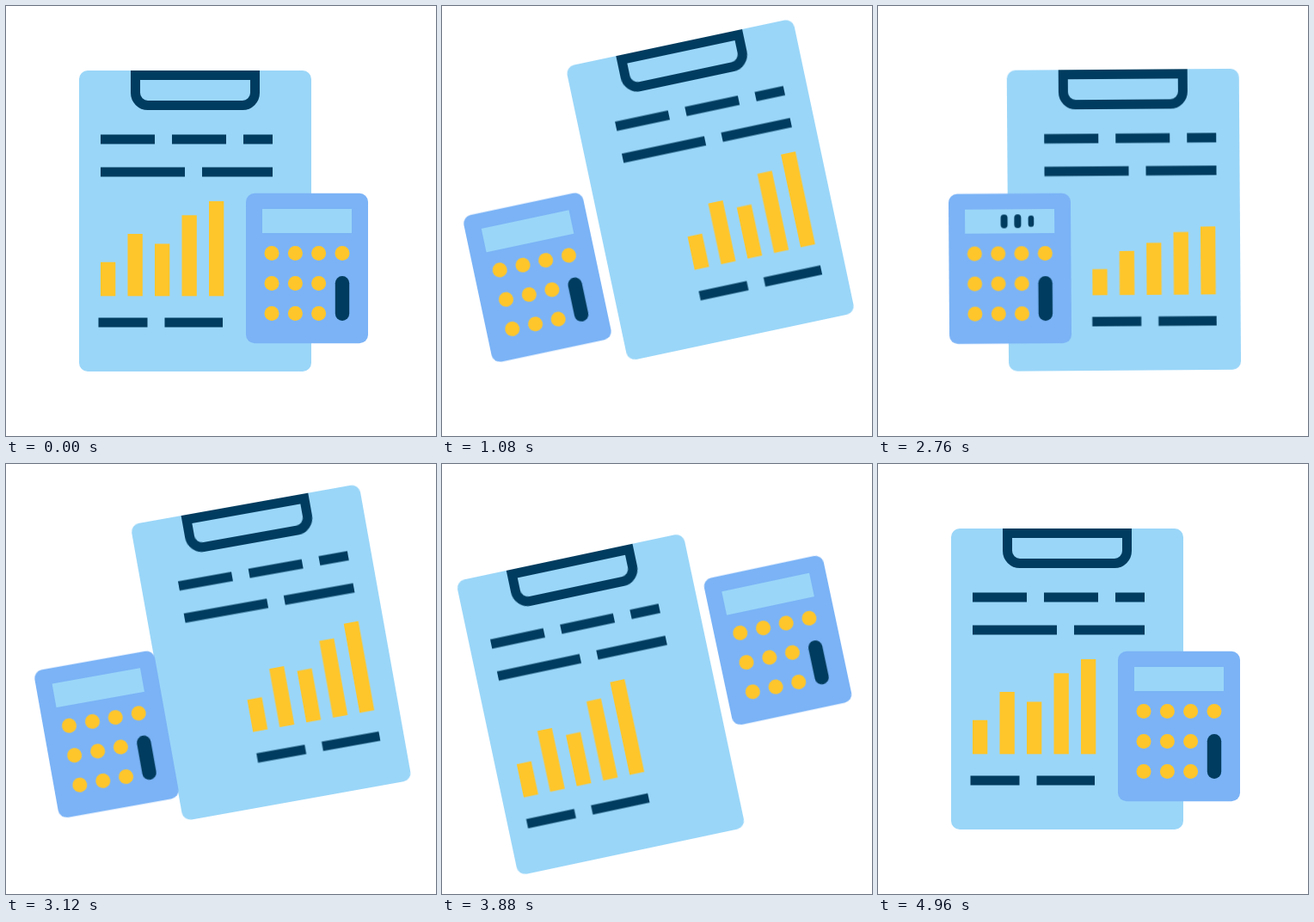
Animation of 500x500 px, one loop 5000 ms. Source, as an HTML page:

```html
<!DOCTYPE html>
<html lang="en">
<head>
<meta charset="utf-8">
<title>Report and calculator</title>
<style>
  html, body { margin: 0; width: 100%; height: 100%; overflow: hidden; background: #fff; }
  svg { position: absolute; left: 0; top: 0; width: 500px; height: 500px; }

  :root {
    --sheet: #9ad6f8;
    --body: #7bb3f6;
    --ink: #003c5f;
    --sun: #ffc62b;
    --ease: cubic-bezier(.333, 0, .667, 1);
  }
  .sheet { fill: var(--sheet); }
  .body { fill: var(--body); }
  .ink { fill: var(--ink); }
  .sun { fill: var(--sun); }
  .clip { fill: none; stroke: var(--ink); stroke-width: 11; }

  #paper { animation: paper 5s var(--ease) infinite; }
  #calc { animation: calc 5s var(--ease) infinite; }
  #front { z-index: 2; animation: layer 5s step-end infinite; }
  #back { z-index: 1; }
  .slide { animation: slide 5s var(--ease) infinite; }
  .bar, .key, .digit { transform-box: fill-box; transform-origin: center; }
  .bar { transform-origin: center bottom; animation: bar 5s var(--ease) infinite; }
  .key { animation: swell 5s var(--ease) infinite; }
  .key.pressed {
    animation: swell 5s var(--ease) infinite,
               press 5s linear calc(var(--k) * .1s - 5s) infinite;
  }
  .digit { animation: digit 5s ease-out calc(var(--k) * .1s - 5s) infinite; }

  @keyframes paper {
    0%, 98%, 100% { transform: translate(220px, 250px) rotate(0deg) scale(1); }
    11%, 76.8%, 77.6% { transform: translate(184.5px, 279.5px) rotate(-12deg) scale(1); }
    22%, 65.2% { transform: translate(312.5px, 213.5px) rotate(-12deg) scale(1); }
    33.2%, 54% { transform: translate(285px, 250px) rotate(0deg) scale(1); }
    86%, 89.6% { transform: translate(220px, 250px) rotate(0deg) scale(1.15); }
  }
  @keyframes calc {
    0%, 98%, 100% { transform: translate(350px, 305px) rotate(0deg) scale(1); }
    11%, 76.8%, 77.6% { transform: translate(390.5px, 205px) rotate(-12deg) scale(1); }
    22%, 65.2% { transform: translate(110px, 316px) rotate(-12deg) scale(1); }
    33.2%, 54% { transform: translate(155px, 305px) rotate(0deg) scale(1); }
    87.4%, 89.6% { transform: translate(350px, 305px) rotate(0deg) scale(1.15); }
  }
  /* The calculator passes behind the sheet while the two swap sides. */
  @keyframes layer {
    0%, 22%, 76.8%, 100% { z-index: 2; }
    11%, 65.2% { z-index: 0; }
  }
  @keyframes slide {
    0%, 11%, 76.8%, 100% { transform: translateX(0); }
    22%, 65.2% { transform: translateX(var(--dx)); }
  }
  @keyframes bar {
    0%, 22%, 65.2%, 100% { transform: scaleY(1); }
    33.2%, 34% { transform: scaleY(var(--low)); }
    43%, 54% { transform: scaleY(var(--rise)); }
  }
  @keyframes swell {
    0%, 79%, 91.2%, 100% { transform: scale(1); }
    84.8% { transform: scale(1.38); }
  }
  @keyframes press {
    0%, 27.2%, 32.8%, 100% { scale: 1; }
    30% { scale: .65; }
  }
  @keyframes digit {
    0%, 28%, 55%, 80.4%, 92%, 100% { transform: scale(0); }
    31.2% { transform: scale(1.34); animation-timing-function: var(--ease); }
    37%, 53%, 82.4%, 90% { transform: scale(1); }
  }
</style>
</head>
<body>
<svg id="back"><g id="paper"></g></svg>
<svg id="front"><g id="calc"></g></svg>
<script>
  const rect = (cls, x, y, w, h, r = 0, style = '') =>
    `<rect class="${cls}" x="${x}" y="${y}" width="${w}" height="${h}" rx="${r}" style="${style}"/>`;
  const slide = (dx, parts) => `<g class="slide" style="--dx:${dx}px">${parts.join('')}</g>`;
  const dash = y => ([x, w]) => rect('ink', x, y, w, 11);

  // Sheet, drawn around its centre
  const BASE = 87.3, DROP = 32.3;
  const bars = [[39.5, 30], [72.3, 50.5], [60.8, 60.5], [94, 72], [110.3, 78]];
  const bar = ([h, next], i) =>
    rect('sun bar', -110 + i * 31.5, BASE - h, 17.3, h, 0,
      `--low:${(h - DROP) / h};--rise:${next / h}`);

  document.getElementById('paper').innerHTML =
    rect('sheet', -135, -175, 270, 350, 10) +
    '<path class="clip" d="M-69.5-169.5H69.5V-149a14.5 14.5 0 0 1-14.5 14.5H-55a14.5 14.5 0 0 1-14.5-14.5Z"/>' +
    slide(18, [
      ...[[-110, 63], [-27, 63], [56, 34]].map(dash(-100.5)),
      ...[[-110, 98], [8, 82]].map(dash(-62.5))
    ]) +
    slide(73, bars.map(bar)) +
    slide(75, [[-112.5, 57], [-35.5, 67.5]].map(dash(112.5)));

  // Calculator, drawn around its centre
  const typed = [1, 3, 8, 5];
  const cols = [-41, -13.6, 13.6, 41];
  const spots = [-17.5, 17.5, 52.5].flatMap((y, row) =>
    cols.slice(0, row ? 3 : 4).map(x => [x, y]));
  const key = ([x, y], i) => {
    const k = typed.indexOf(i);
    return `<circle class="sun key${k < 0 ? '' : ' pressed'}" cx="${x}" cy="${y}" r="8.5" style="--k:${k}"/>`;
  };
  const digit = (x, k) => rect('ink digit', x - 4, -63, 8, 16, 4, `--k:${k}`);

  document.getElementById('calc').innerHTML =
    rect('body', -71, -87.3, 142, 174.6, 10) +
    rect('sheet', -52, -69, 104, 28) +
    [40.3, 24.8, 9.3, -6.5].map(digit).join('') +
    spots.map(key).join('') +
    rect('ink key', 32.8, 9, 16.4, 52, 8.2);
</script>
</body>
</html>
```
